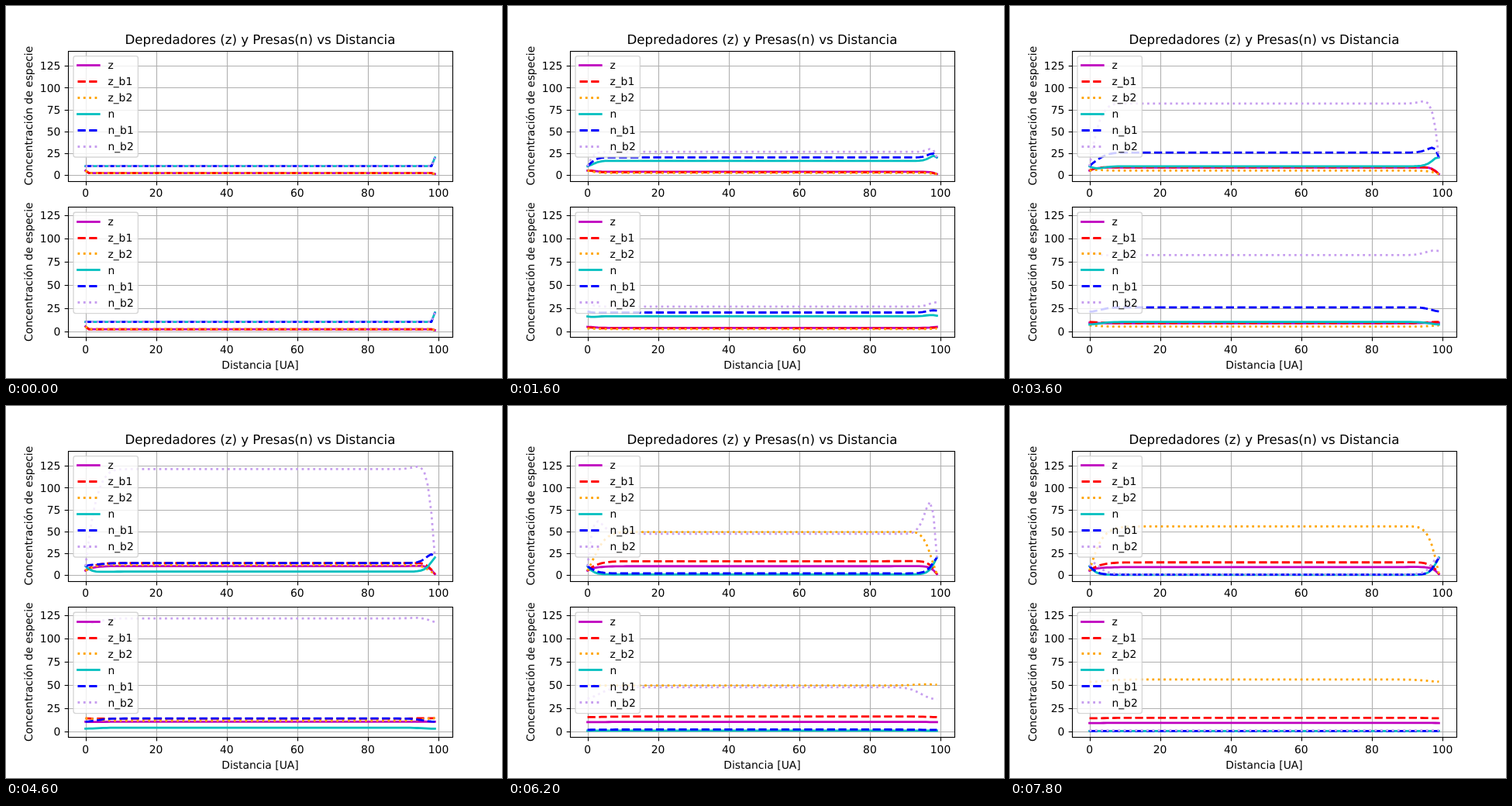
These frames come from a looping animation (640x480 px, 8000 ms). An HTML page:

```html
<!DOCTYPE html>
<html lang="es">
<head>
<meta charset="utf-8">
<title>Depredadores y presas</title>
<style>
  html, body { margin: 0; width: 100%; height: 100%; overflow: hidden; background: #fff; }
  svg { display: block; width: 640px; height: 480px; }
  text { font: 13.89px "DejaVu Sans", sans-serif; fill: #000; text-rendering: geometricPrecision; }
  .title { font-size: 16.67px; }
  .mid { text-anchor: middle; }
  .end { text-anchor: end; }
  .grid { stroke: #b0b0b0; stroke-width: 1.11; }
  .frame { stroke: #000; stroke-width: 1.11; fill: none; }
  .curve { fill: none; stroke-width: 2.78; stroke-linejoin: round; }
  .solid { stroke-linecap: square; }
  .dashed { stroke-dasharray: 10.28 4.44; }
  .dotted { stroke-dasharray: 2.78 4.58; }
  .box { fill: #fff; fill-opacity: .8; stroke: #ccc; stroke-opacity: .8; stroke-width: 1.39; }
</style>
</head>
<body>
<svg id="stage" viewBox="0 0 640 480"></svg>
<script>
const STEP_MS = 200, STEPS = 40, NODES = 100;
const GROWTH = 0.15, DEATH = 0.015, YIELD = 0.2, DIFFUSION = 0.25;
const PREDATION = [0.035, 0.025, 0.01];

const SERIES = [
  ['z', '#bf00bf', 'solid'], ['z_b1', '#ff0000', 'dashed'], ['z_b2', '#ffa500', 'dotted'],
  ['n', '#00bfbf', 'solid'], ['n_b1', '#0000ff', 'dashed'], ['n_b2', '#c79fef', 'dotted']
];
const PANELS = [
  { top: 57.6, scale: 1.125, periodic: false },
  { top: 259.2, scale: 1.199, periodic: true }
];
const LEFT = 80, RIGHT = 576, HEIGHT = 168;

const stage = document.getElementById('stage');
const xAt = v => 102.545 + v * 4.5546;
const snap = v => Math.floor(v + 0.5) + 0.5;

function add(tag, attrs, text) {
  const el = document.createElementNS('http://www.w3.org/2000/svg', tag);
  for (const key in attrs) el.setAttribute(key, attrs[key]);
  if (text !== undefined) el.textContent = text;
  return stage.appendChild(el);
}
const line = (cls, x1, y1, x2, y2, stroke) =>
  add('line', stroke ? { class: cls, x1, y1, x2, y2, stroke } : { class: cls, x1, y1, x2, y2 });
const label = (cls, x, y, text) => add('text', { class: cls, x, y }, text);

// Lotka-Volterra with diffusion, explicit Euler, fixed or periodic ends.
function simulate(b, periodic) {
  let z = Array(NODES).fill(2), n = Array(NODES).fill(10);
  z[0] = 5;
  z[NODES - 1] = 1;
  n[NODES - 1] = 20;
  const spread = (u, i) =>
    DIFFUSION * (u[(i + 1) % NODES] - 2 * u[i] + u[(i + NODES - 1) % NODES]);
  const history = [];
  for (let k = 0; k < STEPS; k++) {
    history.push({ z, n });
    const fixed = i => !periodic && (i === 0 || i === NODES - 1);
    const nextZ = z.map((v, i) => fixed(i) ? v : v + spread(z, i) + v * (YIELD * b * n[i] - DEATH));
    const nextN = n.map((v, i) => fixed(i) ? v : v + spread(n, i) + v * (GROWTH - b * z[i]));
    z = nextZ;
    n = nextN;
  }
  return history;
}

function buildPanel({ top, scale, periodic }) {
  const bottom = top + HEIGHT;
  const yAt = v => bottom - 7.636 - v * scale;
  const x0 = snap(LEFT), x1 = snap(RIGHT), y0 = snap(top), y1 = snap(bottom);
  const xTicks = [0, 20, 40, 60, 80, 100], yTicks = [0, 25, 50, 75, 100, 125];

  for (const v of xTicks) line('grid', snap(xAt(v)), y0, snap(xAt(v)), y1);
  for (const v of yTicks) line('grid', x0, snap(yAt(v)), x1, snap(yAt(v)));
  for (const v of xTicks) {
    line('frame', snap(xAt(v)), y1, snap(xAt(v)), y1 + 4.86);
    label('mid', xAt(v), bottom + 20.3, v);
  }
  for (const v of yTicks) {
    line('frame', x0 - 4.86, snap(yAt(v)), x0, snap(yAt(v)));
    label('end', 70.3, yAt(v) + 5.1, v);
  }

  const runs = PREDATION.map(b => simulate(b, periodic));
  const curves = SERIES.map(([name, stroke, style], i) => {
    const el = add('polyline', { class: 'curve ' + style, stroke });
    const frames = runs[i % 3].map(state =>
      state[name[0]].map((v, x) => xAt(x).toFixed(2) + ',' + yAt(v).toFixed(2)).join(' '));
    return { el, frames };
  });

  add('rect', { class: 'frame', x: x0, y: y0, width: x1 - x0, height: y1 - y0 });
  const middle = top + HEIGHT / 2;
  add('text', { class: 'mid', transform: `translate(34 ${middle}) rotate(-90)` },
    'Concentración de especie');

  add('rect', { class: 'box', x: 87, y: top + 7, width: 83.4, height: 130.4, rx: 2.8 });
  SERIES.forEach(([name, stroke, style], i) => {
    const y = top + 18.9 + 20.95 * i;
    const mid = Math.floor(y) + 0.5;
    line('curve ' + style, 92.5, mid, 120.3, mid, stroke);
    label('', 131.4, y + 4.8, name);
  });
  return curves;
}

add('rect', { width: 640, height: 480, fill: '#fff' });
const curves = PANELS.flatMap(buildPanel);
label('mid title', 328, 49.3, 'Depredadores (z) y Presas(n) vs Distancia');
label('mid', 328, 468, 'Distancia [UA]');

let shown = -1;
const start = performance.now();
function draw(now) {
  const k = Math.floor(Math.max(0, now - start) / STEP_MS) % STEPS;
  if (k !== shown) {
    for (const { el, frames } of curves) el.setAttribute('points', frames[k]);
    shown = k;
  }
  requestAnimationFrame(draw);
}
draw(start);
</script>
</body>
</html>
```
